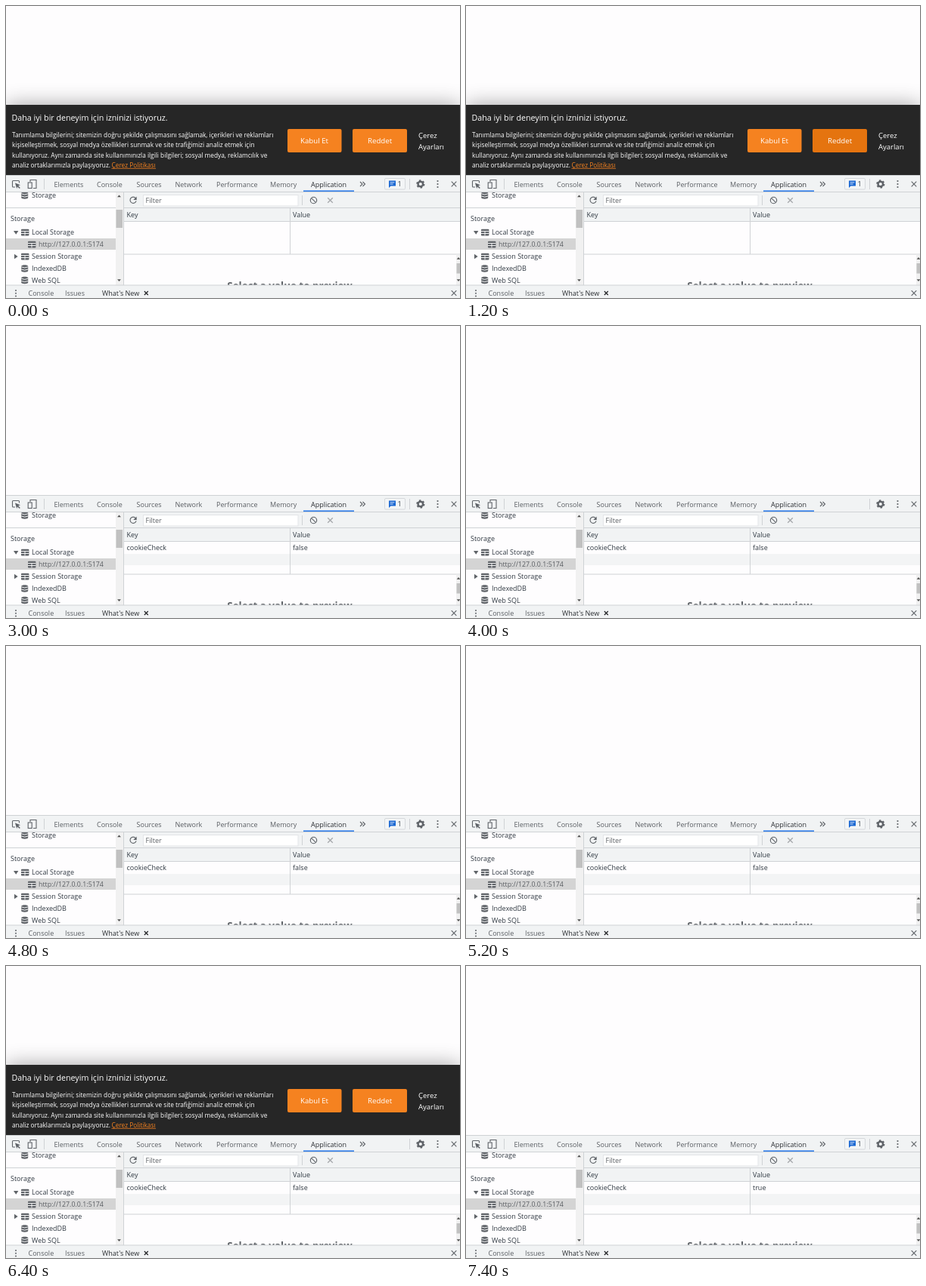
Write an HTML page that moves like this. It is 600 px wide and 387 px high and loops after 8 s.

```html
<!DOCTYPE html>
<html lang="tr">
<head>
<meta charset="utf-8">
<title>Cookie consent</title>
<style>
html, body { margin: 0; width: 100%; height: 100%; overflow: hidden; background: #fefdfe; }
svg { display: block; width: 100vw; height: 100vh; }
text { font-family: "Open Sans", "Noto Sans", sans-serif; font-size: 9px; fill: #303942; white-space: pre; }
.tab { fill: #5a5e63; }
.on { fill: #2b2e32; }
.white { fill: #fff; }
.body { font-size: 8.3px; fill: #fff; }
.btn { font-size: 9.7px; fill: #fff; }
.bar { fill: #f1f3f4; }
.rule { stroke: #cfd2d5; }
.icon { fill: none; stroke: #5f6368; stroke-width: 1.1; }
.solid { fill: #5f6368; }
</style>
</head>
<body>
<svg viewBox="0 0 600 387" preserveAspectRatio="none">
  <defs>
    <filter id="soft" filterUnits="userSpaceOnUse" x="-60" y="50" width="720" height="300">
      <feGaussianBlur stdDeviation="14"/>
    </filter>
    <clipPath id="side"><rect x="0" y="247" width="145" height="123"/></clipPath>
    <clipPath id="preview"><rect x="156" y="329" width="439" height="41"/></clipPath>
    <g id="grid">
      <rect x="-5" y="-4.2" width="10.4" height="8.6" rx="1" fill="#5f6368"/>
      <path d="M-5-1.5H5.4M-5 1.5H5.4M0-1.5V4.4" stroke="#fff" stroke-width=".9"/>
    </g>
    <g id="disk">
      <path d="M-4.5-3C-4.5-5.2 4.5-5.2 4.5-3V3C4.5 5.2-4.5 5.2-4.5 3Z" fill="#5f6368"/>
      <path d="M-4.5-2.2Q0 0 4.5-2.2M-4.5 1Q0 3.2 4.5 1" fill="none" stroke="#fff" stroke-width=".9"/>
    </g>
    <path id="cross" d="M-3.3-3.3L3.3 3.3M3.3-3.3L-3.3 3.3"/>
    <path id="up" d="M-2.4 1.3H2.4L0-1.4Z" fill="#505050"/>
    <path id="down" d="M-2.4-1.3H2.4L0 1.4Z" fill="#505050"/>
  </defs>

  <rect width="600" height="387" fill="#fefdfe"/>

  <g id="banner">
    <rect y="131" width="600" height="120" filter="url(#soft)" opacity=".36"/>
    <rect y="131" width="600" height="94" fill="#262626"/>
    <rect id="accept" x="372" y="163" width="71.5" height="31" rx="2"/>
    <rect id="reject" x="458" y="163" width="72" height="31" rx="2"/>
    <g id="bannerText"></g>
    <path d="M139.5 215.3H198" stroke="#f58220" stroke-width=".8"/>
  </g>

  <g id="tools">
    <rect class="bar" y="224" width="600" height="23"/>
    <path class="rule" d="M0 224.5H600M0 246.5H600M50.5 229V243"/>
    <rect x="393" y="244.4" width="67" height="1.6" fill="#2f7de9"/>
    <path class="icon" d="M12 240H9.5Q8.5 240 8.5 239V232.5Q8.5 231.5 9.5 231.5H16.5Q17.5 231.5 17.5 232.5V234.5"/>
    <path class="solid" d="M12 234.5L19 237.2L16.3 238.3L18.8 241L17.8 242L15.2 239.4L14.2 242Z"/>
    <path class="icon" d="M32 233V230.5H40V241.5H36"/>
    <rect class="icon" x="29.2" y="234" width="5" height="7.5"/>
    <path class="icon" d="M468 233L471 236L468 239M471.5 233L474.5 236L471.5 239"/>
    <g id="badge">
      <rect x="500.5" y="228.5" width="27" height="14.5" rx="1.5" fill="#f3f5f6" stroke="#d5d8db"/>
      <path d="M506 231.5H515V238.5H508.5L506 241Z" fill="#1a67d2"/>
      <path d="M507.6 233.8H513.4M507.6 236H511.6" stroke="#fff" stroke-width=".8"/>
      <text x="517.5" y="239.3">1</text>
    </g>
    <path class="rule" d="M533.5 229V243"/>
    <g transform="translate(547.8 236)">
      <circle r="3.3" fill="none" stroke="#5f6368" stroke-width="2.4"/>
      <circle r="4.8" fill="none" stroke="#5f6368" stroke-width="1.7" stroke-dasharray="2.4 2.626"/>
    </g>
    <g class="solid"><circle cx="570.5" cy="232" r="1.1"/><circle cx="570.5" cy="236" r="1.1"/><circle cx="570.5" cy="240" r="1.1"/></g>
    <use href="#cross" x="592" y="236" class="icon"/>
  </g>

  <g id="sidebar">
    <rect y="247" width="155" height="123" fill="#fefdfe"/>
    <g clip-path="url(#side)">
      <rect y="308" width="145" height="15" fill="#d4d4d4"/>
      <path class="rule" d="M0 267.5H145"/>
      <use href="#disk" x="24.7" y="251"/>
      <use href="#grid" x="25" y="300"/>
      <use href="#grid" x="34" y="316"/>
      <use href="#grid" x="25" y="332"/>
      <use href="#disk" x="24.7" y="348"/>
      <use href="#disk" x="24.7" y="363.5"/>
      <path class="solid" d="M10 298H16.4L13.2 302.8Z"/>
      <path class="solid" d="M11 328.8V335.2L15.6 332Z"/>
      <g id="sideText"></g>
    </g>
    <rect x="145" y="247" width="10" height="123" fill="#f1f1f1"/>
    <rect x="145.5" y="270" width="8.5" height="24" fill="#c1c1c1"/>
    <use href="#up" x="149.5" y="252"/>
    <use href="#down" x="149.5" y="363.5"/>
    <path class="rule" d="M155.5 247V370"/>
  </g>

  <g id="table">
    <rect class="bar" x="156" y="247" width="444" height="38"/>
    <rect x="181.5" y="250.5" width="204.5" height="14.5" fill="#fff" stroke="#e3e5e8"/>
    <path class="rule" d="M156 267.5H600M391.5 251V264"/>
    <path class="icon" d="M171.3 254.6A4.1 4.1 0 1 0 172.1 258.4"/>
    <path class="solid" d="M172.7 252.6V257H168.3Z"/>
    <circle class="icon" cx="406.5" cy="257.5" r="4.2"/>
    <path class="icon" d="M403.6 254.6L409.4 260.4"/>
    <use href="#cross" x="428.5" y="257.5" fill="none" stroke="#a5a8ab" stroke-width="1.3"/>
    <rect x="156" y="285" width="444" height="44" fill="#fefdfe"/>
    <g id="entry">
      <rect x="156" y="302" width="444" height="15" fill="#f3f4f5"/>
      <text x="159.5" y="297.2">cookieCheck</text>
      <text id="value" x="379" y="297.2"></text>
    </g>
    <path class="rule" d="M156 285.5H600M375.5 268V329"/>
    <g id="tableText"></g>
  </g>

  <g id="pane">
    <rect x="156" y="329" width="444" height="41" fill="#fefdfe"/>
    <path class="rule" d="M156 329H600"/>
    <g clip-path="url(#preview)">
      <text x="375" y="375.5" text-anchor="middle" style="font-size:13.4px;font-weight:700;fill:#5f6368">Select a value to preview</text>
    </g>
    <rect x="595" y="329.5" width="5" height="40.5" fill="#f1f1f1"/>
    <rect x="595.5" y="341" width="4.5" height="13.5" fill="#c1c1c1"/>
    <use href="#up" x="598" y="334.5"/>
    <use href="#down" x="598" y="363.5"/>
  </g>

  <g id="drawer">
    <rect class="bar" y="370" width="600" height="17"/>
    <path class="rule" d="M0 370H600"/>
    <g class="solid"><circle cx="13" cy="377" r="1"/><circle cx="13" cy="380.7" r="1"/><circle cx="13" cy="384.4" r="1"/></g>
    <use href="#cross" transform="translate(185.3 380.5) scale(.75)" fill="none" stroke="#202124" stroke-width="1.6"/>
    <use href="#cross" x="592" y="380.5" class="icon"/>
    <g id="drawerText"></g>
  </g>
</svg>
<script>
const LOOP = 8000;
const ORANGE = "#f58220", HOVER = "#e5740f";
const el = id => document.getElementById(id);

function write(id, rows) {
  for (const [x, y, words, cls, style] of rows) {
    const node = document.createElementNS("http://www.w3.org/2000/svg", "text");
    node.setAttribute("x", x);
    node.setAttribute("y", y);
    if (cls) node.setAttribute("class", cls);
    if (style) node.style.cssText = style;
    node.textContent = words;
    el(id).append(node);
  }
}

write("bannerText", [
  [7.5, 152, "Daha iyi bir deneyim için izninizi istiyoruz.", "white", "font-size:10.7px"],
  [8, 173.6, "Tanımlama bilgilerini; sitemizin doğru şekilde çalışmasını sağlamak, içerikleri ve reklamları", "body"],
  [8, 187, "kişiselleştirmek, sosyal medya özellikleri sunmak ve site trafiğimizi analiz etmek için", "body"],
  [8, 200.5, "kullanıyoruz. Aynı zamanda site kullanımınızla ilgili bilgileri; sosyal medya, reklamcılık ve", "body"],
  [8, 214, "analiz ortaklarımızla paylaşıyoruz.", "body"],
  [139.5, 214, "Çerez Politikası", "body", "fill:#f58220"],
  [389, 182, "Kabul Et", "btn"],
  [478, 182, "Reddet", "btn"],
  [545, 174.5, "Çerez", "btn", "font-size:9.5px"],
  [545, 190, "Ayarları", "btn", "font-size:9.5px"]
]);

const tabs = [[63.5, "Elements"], [120, "Console"], [172.5, "Sources"], [223.5, "Network"],
  [278, "Performance"], [349, "Memory"], [403, "Application"]];
write("tools", tabs.map(([x, name]) => [x, 239.6, name, name === "Application" ? "on" : "tab"]));

write("sideText", [
  [34, 254.3, "Storage"],
  [6, 284.6, "Storage"],
  [34, 303.4, "Local Storage"],
  [43, 319.2, "http://127.0.0.1:5174", "tab", "font-size:8.85px"],
  [34, 335.4, "Session Storage"],
  [34, 351.2, "IndexedDB"],
  [34, 366.8, "Web SQL"]
]);

write("tableText", [
  [184.5, 260.7, "Filter", "tab"],
  [159.5, 279.8, "Key"],
  [379, 279.8, "Value"]
]);

write("drawerText", [
  [29.5, 383.8, "Console", "tab"],
  [78, 383.8, "Issues", "tab"],
  [127, 383.8, "What's New", "on"]
]);

const within = (t, spans) => spans.some(([a, b]) => t >= a && t < b);
const show = (id, on) => el(id).setAttribute("visibility", on ? "visible" : "hidden");
const tint = (id, hot) => el(id).setAttribute("fill", hot ? HOVER : ORANGE);

// Reject, reload and reject again, then reload and accept.
function render(t) {
  show("banner", within(t, [[0, 1600], [4200, 4800], [6400, 7000]]));
  show("badge", !within(t, [[4000, 4400], [6400, 6600]]));
  show("entry", t >= 1600);
  el("value").textContent = t < 7000 ? "false" : "true";
  tint("reject", within(t, [[1200, 1600], [4400, 4800]]));
  tint("accept", within(t, [[6800, 7000]]));
}

const start = performance.now();
function tick() {
  render((performance.now() - start) % LOOP);
  requestAnimationFrame(tick);
}
tick();
</script>
</body>
</html>
```
